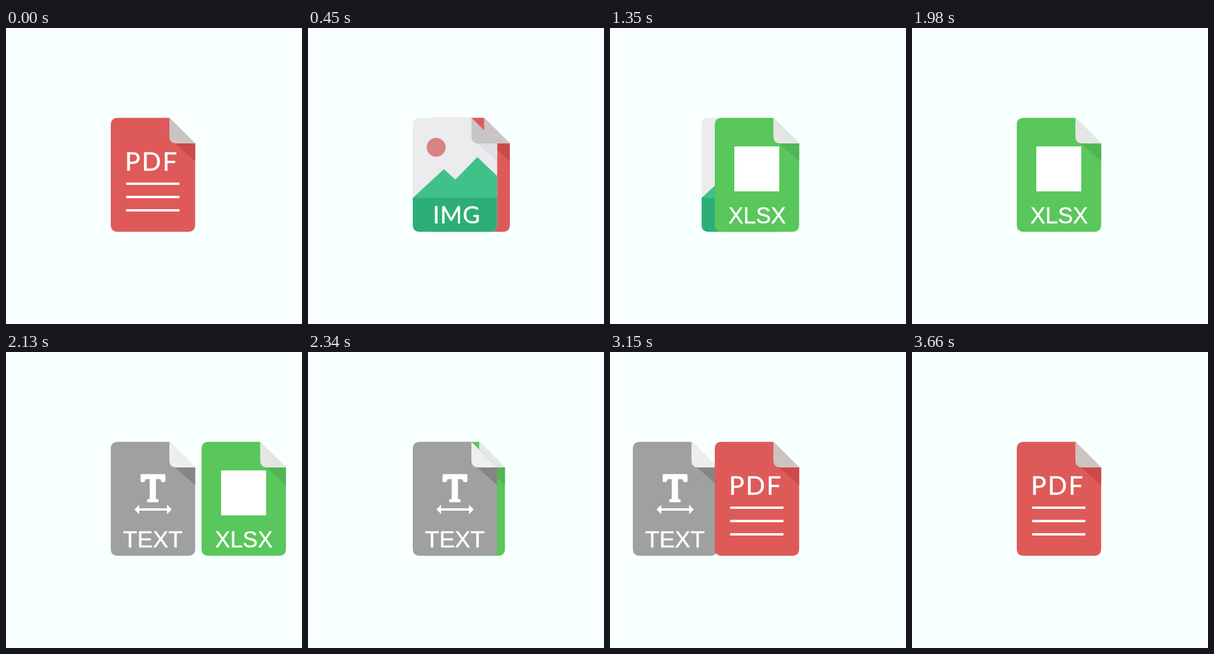
An HTML page for the animation above (3690 ms loop, 500 by 500 pixels).

```html
<!DOCTYPE html>
<html lang="en">
<head>
<meta charset="utf-8">
<title>File types</title>
<style>
  html, body { margin: 0; width: 100%; height: 100%; overflow: hidden; background: #f8ffff; }
  svg { display: block; width: 100%; height: 100%; }
  text { fill: #fff; stroke: #fff; stroke-width: .5; }
  .round { font-family: Lato, Inter, sans-serif; }
  .plain { font-family: "Liberation Sans", Arial, sans-serif; }
</style>
</head>
<body>
<svg id="stage" viewBox="0 0 500 500">
  <defs>
    <path id="sheet" d="M189 151.700H276L319.500 195V332.300q0 12-12 12H189q-12 0-12-12V163.700q0-12 12-12z"/>
    <path id="shade" d="M280 190L319.500 225V195H288z"/>
    <path id="fold" d="M276 151.700V183q0 12 12 12H319.500z"/>
  </defs>

  <g class="card">
    <use href="#sheet" fill="#de5a59"/>
    <use href="#shade" fill="#cb4a4a"/>
    <use href="#fold" fill="#cac5c3"/>
    <text class="round" x="201" y="240.500" font-size="43" letter-spacing="2.500">PDF</text>
    <path d="M203 263H293M203 285.500H293M203 308H293" stroke="#fff" stroke-width="4"/>
  </g>

  <g class="card">
    <use href="#sheet" fill="#ecebee"/>
    <use href="#shade" fill="#e0dfe4"/>
    <use href="#fold" id="imgFold"/>
    <circle id="sun" cx="216.500" cy="201.500" r="16"/>
    <path d="M177 287L229.500 238.500L249 256L286 218L319.500 250V287z" fill="#40c189"/>
    <path d="M177 287H319.500V332.300q0 12-12 12H189q-12 0-12-12z" fill="#2dae77"/>
    <text class="round" x="211" y="330" font-size="40" letter-spacing="1">IMG</text>
  </g>

  <g class="card">
    <use href="#sheet" fill="#59c75b"/>
    <use href="#shade" fill="#51b455"/>
    <use href="#fold" fill="#e4e6e4"/>
    <rect x="210" y="200" width="76" height="76" fill="#fff"/>
    <text class="plain" x="200" y="329.500" font-size="38">XLSX</text>
  </g>

  <g class="card">
    <use href="#sheet" fill="#9fa1a0"/>
    <use href="#shade" fill="#858585"/>
    <use href="#fold" fill="#eee"/>
    <path d="M229 208H267.500V218H264L261.500 213H251.500V249.500L256 250.500V252H240V250.500L244.500 249.500V213H235L232.500 218H229z"
      fill="#fff" stroke="#fff" stroke-width="3.500" stroke-linejoin="round"/>
    <path d="M217 266L225 258V264H272V258L280 266L272 274V268H225V274z" fill="#fff"/>
    <text class="plain" x="197.500" y="329.500" font-size="39.500">TEXT</text>
  </g>
</svg>
<script>
const LOOP = 3690, REVEAL = 40, OUT = 175, MOVE = 442;
const starts = [120, 1020, 1990, 2920];
const stage = document.getElementById('stage');
const sun = document.getElementById('sun');
const imgFold = document.getElementById('imgFold');
const cards = [...document.querySelectorAll('.card')];

// cubic-bezier(.4, 0, .2, 1)
function ease(x) {
  if (x <= 0) return 0;
  if (x >= 1) return 1;
  let lo = 0, hi = 1, u;
  for (let i = 0; i < 24; i++) {
    u = (lo + hi) / 2;
    const v = 1 - u;
    if (1.2 * v * v * u + 0.6 * v * u * u + u * u * u < x) lo = u;
    else hi = u;
  }
  return u * u * (3 - 2 * u);
}

function place(card, x, visible) {
  card.setAttribute('transform', `translate(${x} 0)`);
  card.style.display = visible ? '' : 'none';
}

function draw(now) {
  const t = now % LOOP;
  const at = (t - starts[0] + LOOP) % LOOP + starts[0];
  const i = starts.filter(s => s <= at).length - 1;
  const e = at - starts[i];
  const leaving = cards[i], next = cards[(i + 1) % cards.length];
  const away = e < OUT ? ease(e / OUT) : 1 - ease((e - OUT) / (MOVE - OUT));

  cards.forEach(card => place(card, 0, false));
  place(leaving, away * (i % 2 ? -163 : 157), e < MOVE);
  place(next, 0, e > REVEAL);
  // The leaving card passes behind the next one at its far point.
  stage.append(...(e < OUT ? [next, leaving] : [leaving, next]));

  const muted = t < 690;
  sun.setAttribute('fill', muted ? '#d88384' : '#f2d55c');
  imgFold.setAttribute('fill', muted ? '#c6c6c8' : '#d9dfc8');
  requestAnimationFrame(draw);
}
requestAnimationFrame(draw);
</script>
</body>
</html>
```
